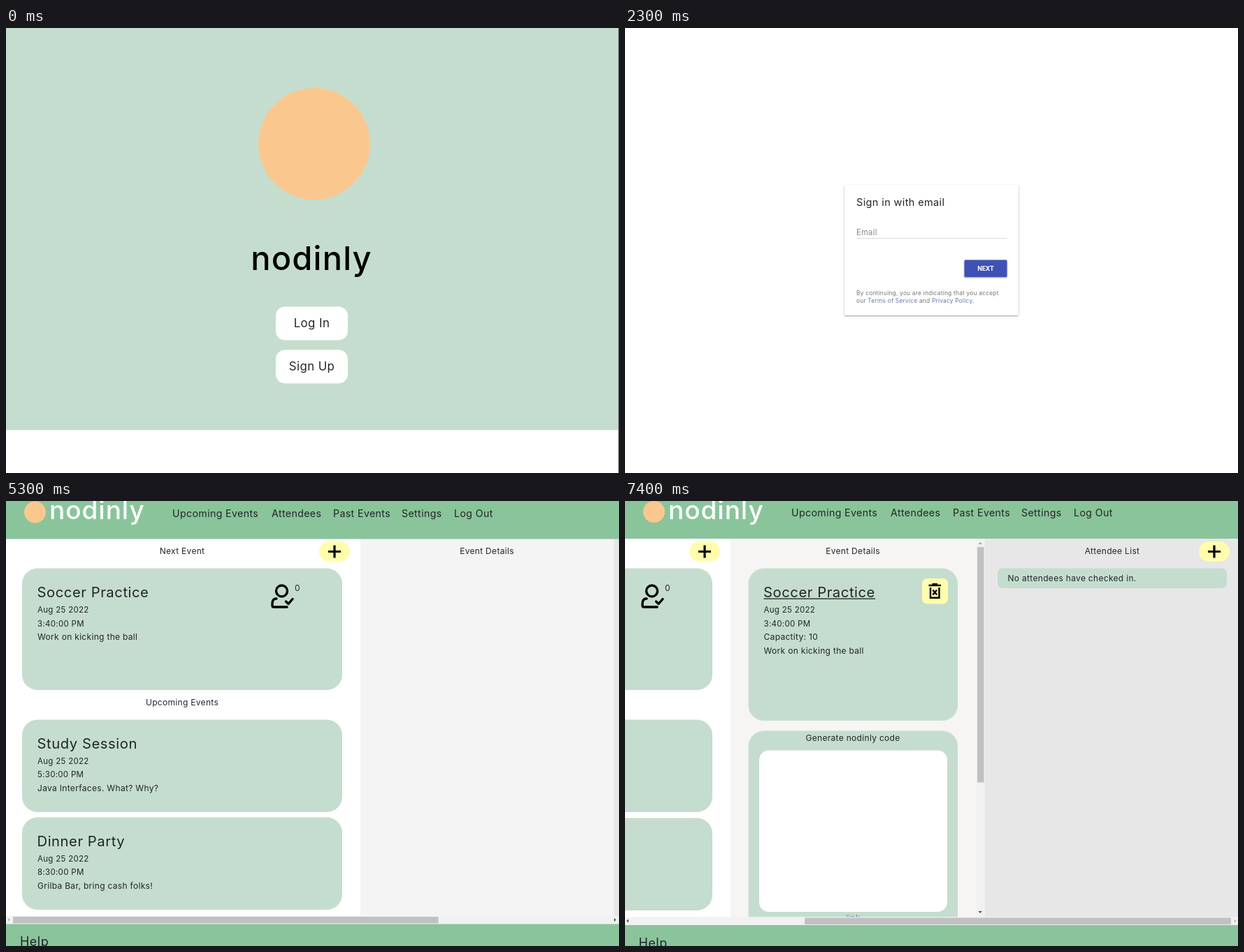
An HTML page that plays this animation: 877 px wide and 638 px high, repeating every 8 s.

```html
<!DOCTYPE html>
<html lang="en">
<head>
<meta charset="utf-8">
<title>Event manager walkthrough</title>
<style>
  html, body { margin: 0; width: 100%; height: 100%; overflow: hidden; background: #fff; }
  svg { display: block; width: 877px; height: 638px; }
  text { font-family: Inter, "Open Sans", sans-serif; letter-spacing: .026em; fill: #212529; }

  /* Each scene covers the one before it. */
  .scene { visibility: hidden; animation: 8s step-end infinite; }
  #signin { animation-name: signin; }
  #events { animation-name: events; }
  #details { animation-name: details; }
  @keyframes signin { 0% { visibility: hidden; } 6.25%, 100% { visibility: visible; } }
  @keyframes events { 0% { visibility: hidden; } 43.75%, 100% { visibility: visible; } }
  @keyframes details { 0% { visibility: hidden; } 81.25%, 100% { visibility: visible; } }

  .mid { text-anchor: middle; }
  .body text, text.body { font-size: 12px; }
  .body .date { font-size: 11.5px; }
  .body .title { font-size: 20.3px; }
  .body .link { fill: #5b7fc0; }
  .nav text { font-size: 14.2px; }
  .button { font-size: 16.8px; }
  .wordmark { font-size: 47px; font-weight: 500; fill: #000; }
  .brand { font-size: 37px; font-weight: 500; fill: #fff; }
  .help { font-size: 18px; }
  .hint { font-size: 11.2px; fill: #8a8a8a; }
  .next { font: 700 9.4px Roboto, sans-serif; letter-spacing: 0; fill: #fff; }
  .small { font-size: 8.4px; fill: #757575; }
  .small tspan { fill: #6478a4; }
  .bar { fill: #8ac49b; }
  .card { fill: #c5ddce; }
  .logo { fill: #fac88f; }
  .pale { fill: #fefdae; }
  .track { fill: #f1f1f1; }
  .thumb { fill: #c1c1c1; }
  .arrow { fill: #505050; }
  .arrow.off { fill: #a3a3a3; }
  .line { fill: none; stroke: #000; stroke-width: 3.4; stroke-linecap: round; stroke-linejoin: round; }
  .bin { fill: none; stroke: #000; stroke-width: 2.4; }
</style>
</head>
<body>
<svg viewBox="0 0 877 638">
  <defs>
    <filter id="shadow" x="-10%" y="-10%" width="120%" height="130%">
      <feDropShadow dx="0" dy="1" stdDeviation="1" flood-opacity=".4"/>
    </filter>
    <clipPath id="pane"><rect x="151" y="54" width="352" height="542.5"/></clipPath>
    <g id="add">
      <rect class="pale" x="-22" y="-14.5" width="44" height="29" rx="14.5"/>
      <path d="M-9 0H9M0-9V9" stroke="#000" stroke-width="3.2"/>
    </g>
    <g id="guests">
      <circle class="line" cx="394.5" cy="129" r="8"/>
      <path class="line" d="M402 152H383Q381 152 381 150V147Q381 140 387 140M400.5 144L404 147.5L410 140.5"/>
      <text class="body" x="413" y="129">0</text>
    </g>
    <g id="list">
      <use href="#add" x="470" y="72.5"/>
      <rect class="card" x="23" y="96.5" width="458" height="174.5" rx="22"/>
      <rect class="card" x="23" y="313.5" width="458" height="132.5" rx="22"/>
      <use href="#guests"/>
    </g>
    <g id="header">
      <rect class="bar" width="877" height="54.5"/>
      <circle class="logo" cx="41.5" cy="16" r="15.5"/>
      <text class="brand" x="62" y="26">nodinly</text>
    </g>
  </defs>

  <g id="welcome">
    <rect width="877" height="638" fill="#fff"/>
    <rect class="card" width="876" height="576.5"/>
    <rect x="876" width="1" height="638" fill="#5c605e"/>
    <circle class="logo" cx="441" cy="166" r="80"/>
    <text class="wordmark mid" x="437" y="347">nodinly</text>
    <rect x="386" y="399.5" width="103" height="48" rx="13" fill="#fff"/>
    <rect x="386" y="461.5" width="103" height="48" rx="13" fill="#fff"/>
    <text class="button mid" x="437.5" y="429">Log In</text>
    <text class="button mid" x="437.5" y="491">Sign Up</text>
  </g>

  <g id="signin" class="scene">
    <rect width="877" height="638" fill="#fff"/>
    <rect x="314" y="225" width="249" height="187" rx="1.5" fill="#fff" filter="url(#shadow)"/>
    <text x="331" y="255" font-size="14.5">Sign in with email</text>
    <text class="hint" x="331" y="297">Email</text>
    <rect x="331" y="301" width="215.5" height="1" fill="#d8d8d8"/>
    <rect x="485.5" y="332.5" width="61" height="24.5" rx="1.5" fill="#3f51b5" filter="url(#shadow)"/>
    <text class="next mid" x="516" y="348">NEXT</text>
    <text class="small" x="331" y="382.5">By continuing, you are indicating that you accept</text>
    <text class="small" x="331" y="393.5">our <tspan>Terms of Service</tspan> and <tspan>Privacy Policy</tspan>.</text>
  </g>

  <g id="events" class="scene">
    <rect width="877" height="638" fill="#fff"/>
    <rect x="507" y="54" width="363" height="541" fill="#f4f4f4"/>
    <rect x="869.5" y="54" width="7.5" height="541" fill="#e7e7e7"/>
    <use href="#header"/>
    <g class="nav">
      <text x="238" y="23">Upcoming Events</text>
      <text x="380" y="23">Attendees</text>
      <text x="468" y="23">Past Events</text>
      <text x="566" y="23">Settings</text>
      <text x="641" y="23">Log Out</text>
    </g>
    <use href="#list"/>
    <rect class="card" x="23" y="453.5" width="458" height="132.5" rx="22"/>
    <g class="body">
      <text class="mid" x="252" y="76">Next Event</text>
      <text class="mid" x="688" y="76">Event Details</text>
      <text class="mid" x="252" y="293">Upcoming Events</text>
      <text class="title" x="44.5" y="138">Soccer Practice</text>
      <text class="date" x="45" y="160">Aug 25 2022</text>
      <text class="date" x="45" y="179.5">3:40:00 PM</text>
      <text x="45" y="199">Work on kicking the ball</text>
      <text class="title" x="44.5" y="354.5">Study Session</text>
      <text class="date" x="45" y="376.5">Aug 25 2022</text>
      <text class="date" x="45" y="396">5:30:00 PM</text>
      <text x="45" y="415.5">Java Interfaces. What? Why?</text>
      <text class="title" x="44.5" y="494.5">Dinner Party</text>
      <text class="date" x="45" y="516.5">Aug 25 2022</text>
      <text class="date" x="45" y="536">8:30:00 PM</text>
      <text x="45" y="556">Grilba Bar, bring cash folks!</text>
    </g>
    <rect class="track" y="595" width="877" height="11.5"/>
    <rect class="thumb" x="10" y="596" width="608.5" height="9.5"/>
    <path class="arrow off" d="M5 598.5V602.5L2.5 600.5Z"/>
    <path class="arrow" d="M870 598V603L873 600.5Z"/>
    <rect class="bar" y="606.5" width="877" height="32"/>
    <text class="help" x="20" y="638">Help</text>
  </g>

  <g id="details" class="scene">
    <rect width="877" height="638" fill="#fff"/>
    <rect x="151" y="54" width="352" height="543" fill="#f6f5f4"/>
    <rect x="515" y="54" width="362" height="543" fill="#e7e7e7"/>
    <use href="#list" x="-356"/>
    <rect class="card" x="-333" y="454.5" width="458" height="132.5" rx="22"/>
    <use href="#header" y="-0.5"/>
    <g class="nav">
      <text x="238" y="22">Upcoming Events</text>
      <text x="380" y="22">Attendees</text>
      <text x="469" y="22">Past Events</text>
      <text x="567" y="22">Settings</text>
      <text x="642" y="22">Log Out</text>
    </g>
    <g class="body" clip-path="url(#pane)">
      <text class="mid" x="326" y="76">Event Details</text>
      <rect class="card" x="176.5" y="96.5" width="299.5" height="218.5" rx="22"/>
      <text class="title" x="198" y="137.5">Soccer Practice</text>
      <rect x="198.5" y="139.5" width="159.5" height="1.3" fill="#212529"/>
      <text class="date" x="198.5" y="160">Aug 25 2022</text>
      <text class="date" x="198.5" y="179.5">3:40:00 PM</text>
      <text x="198.5" y="199">Capactity: 10</text>
      <text x="198.5" y="218.5">Work on kicking the ball</text>
      <rect class="pale" x="425" y="111" width="37" height="36.5" rx="7"/>
      <path class="bin" d="M434.5 121H452M439.5 119.2H447M437 124V138.8H449.5V124M440.3 127.5L446.2 134.5M446.2 127.5L440.3 134.5"/>
      <rect class="card" x="176.5" y="329.5" width="299.5" height="300" rx="22"/>
      <text class="mid" x="326" y="344">Generate nodinly code</text>
      <rect x="192" y="357.5" width="269" height="231.5" rx="14" fill="#fff"/>
      <text class="link mid" x="326.5" y="601.5">link</text>
    </g>
    <rect class="track" x="503" y="54" width="12" height="543"/>
    <rect class="thumb" x="504" y="66" width="9.5" height="337.5"/>
    <path class="arrow off" d="M505.5 62H511L508.2 59Z"/>
    <path class="arrow" d="M505.5 588H511L508.2 591Z"/>
    <g class="body">
      <text class="mid" x="697" y="76">Attendee List</text>
      <use href="#add" x="843" y="72.5"/>
      <rect class="card" x="533" y="96.5" width="328" height="28.5" rx="7"/>
      <text x="547.5" y="114.5">No attendees have checked in.</text>
    </g>
    <rect class="track" y="596.5" width="877" height="11.5"/>
    <rect class="thumb" x="257" y="597.5" width="610" height="9.5"/>
    <path class="arrow" d="M5 599.5V604.5L2 602Z"/>
    <path class="arrow off" d="M872 600V604L874.5 602Z"/>
    <rect class="bar" y="608" width="877" height="30"/>
    <text class="help" x="19.5" y="639.5">Help</text>
  </g>
</svg>
</body>
</html>
```
